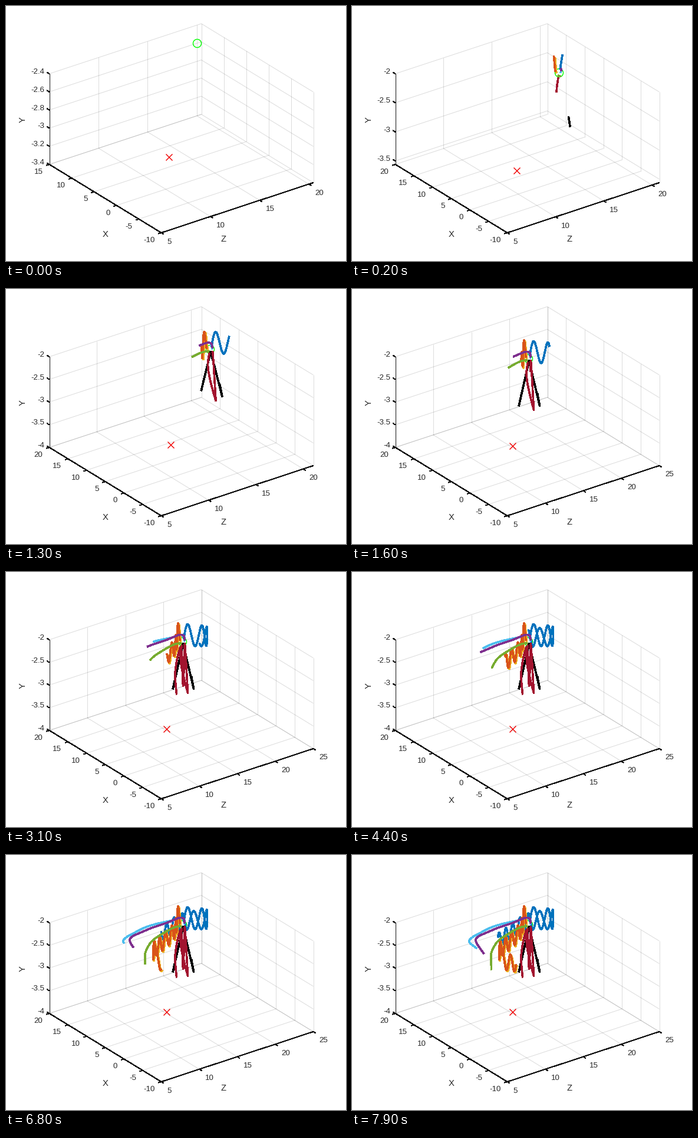
A matplotlib script for the animation above (8000 ms loop, 577 px wide and 433 px high).

```python
import numpy as np
import matplotlib.pyplot as plt
from matplotlib.animation import FuncAnimation
from matplotlib.collections import LineCollection

W, H, DPI = 577, 433, 100
FRAMES, INTERVAL = 80, 100
PX = 72 / DPI  # points per pixel

plt.rcParams["font.family"] = "Liberation Sans"

# Screen vectors of the orthographic box
ORIGIN = np.array([264.0, 385.0])
EX = np.array([-190.0, -116.0])
EY = np.array([0.0, -154.0])
EZ = np.array([258.0, -85.0])


def project(x, y, z, lim):
    x0, x1, y0, y1, z0, z1 = lim
    u = np.atleast_1d((x - x0) / (x1 - x0))[:, None]
    w = np.atleast_1d((y - y0) / (y1 - y0))[:, None]
    v = np.atleast_1d((z - z0) / (z1 - z0))[:, None]
    return ORIGIN + u * EX + w * EY + v * EZ


def unproject(px, py, slope):
    """Lift final-view pixels into space, with depth varying along the screen."""
    v = (14.8 + slope * (px - 300)) / 20
    u = (ORIGIN[0] + EZ[0] * v - px) / -EX[0]
    w = (ORIGIN[1] + EX[1] * u + EZ[1] * v - py) / -EY[1]
    return -10 + 30 * u, -4 + 2 * w, 5 + 20 * v


def smooth(t, keys, vals):
    """Cubic interpolation that is flat at local extremes."""
    h = np.diff(keys)
    d = np.diff(vals) / h
    m = np.zeros(len(keys))
    m[0], m[-1] = d[0], d[-1]
    same = d[:-1] * d[1:] > 0
    m[1:-1][same] = 2 * d[:-1][same] * d[1:][same] / (d[:-1] + d[1:])[same]
    i = np.clip(np.searchsorted(keys, t, side="right") - 1, 0, len(h) - 1)
    s = (t - keys[i]) / h[i]
    return ((1 + 2 * s) * (1 - s) ** 2 * vals[i] + s * (1 - s) ** 2 * h[i] * m[i]
            + s * s * (3 - 2 * s) * vals[i + 1] + s * s * (s - 1) * h[i] * m[i + 1])


def trail(color, *keys, wave=None, shift=(0, 0), slope=0.025, curve=smooth):
    """A glide through (frame, x, y) keys, with an optional vertical wave."""
    kt, kx, ky = np.array(keys, float).T
    t = np.arange(0, kt[-1] + 0.01, 0.1)
    x = curve(t, kt, kx) + shift[0]
    y = curve(t, kt, ky) + shift[1]
    if wave:
        y -= wave(t)
    return color, t, unproject(x, y, slope)


def quickening(t):
    s = t - 3.5
    return (19 - 0.1 * t) * np.cos(2 * np.pi * (s / 11.3 + 0.000265 * s * s))


def steady(t):
    return (14 + 10 * np.exp(-t / 6)) * np.cos(2 * np.pi * (t - 4) / 9.7)


ARM = [(0, 295.5, 96), (5, 291.5, 109), (16, 287.5, 125), (42, 262, 152),
       (57, 250, 163), (68, 264, 182), (79, 279, 184)]

TRAILS = [
    trail("#0072BD", (0, 302, 107), (23, 342, 109), (39.5, 307, 112),
          (79, 248, 144), wave=quickening),
    trail("#4DBEEE", (0, 303, 118), (6, 304, 111), (16, 297, 109),
          (31, 250, 118.5), (42, 226, 128), (64, 199.5, 146.5), (79, 212.5, 159)),
    trail("#EDB120", *ARM, wave=steady, shift=(1.5, 2), slope=0.1),
    trail("#D95319", *ARM, wave=steady, slope=0.1),
    trail("#7E2F8E", (0, 304, 116), (5, 302, 108), (8, 297, 106.5), (16, 274, 115),
          (31, 240, 127), (54, 210.5, 144), (79, 224.5, 168)),
    trail("#77AC30", (0, 303, 123), (3, 296, 121), (16, 265.5, 134),
          (31, 245, 150), (51, 236.5, 170), (79, 237, 195)),
    trail("#000000", (0, 315, 177), (3, 319, 198), (7, 301, 122),
          (14, 283.5, 199), curve=np.interp),
    trail("#A2142F", (0, 299, 124), (2, 296.5, 143), (8, 309, 205), (12, 304, 122),
          (24, 301, 193), (27, 297, 127), (29.5, 287.5, 175), (31, 290, 208)),
]


def limits(n):
    """Axis limits and step of the vertical ticks."""
    z1 = 20.45 + 0.62 * (1 - np.exp(-n / 3)) if n < 16 else 25
    if n == 0:
        return (-10, 15, -3.4, -2.4, 5, z1), 0.2
    return (-10, 20, -3.56 if n < 3 else -4, -2, 5, z1), 0.5


def ticks(lo, hi, step):
    return np.arange(np.ceil(lo / step - 1e-6), np.floor(hi / step + 1e-6) + 1) * step


def draw_box(lim, ystep):
    x0, x1, y0, y1, z0, z1 = lim
    at = lambda x, y, z: project(x, y, z, lim)[0]
    xt, yt, zt = ticks(x0, x1, 5), ticks(y0, y1, ystep), ticks(z0, z1, 5)

    grid = []
    for x in xt:
        grid += [(at(x, y0, z0), at(x, y0, z1)), (at(x, y0, z1), at(x, y1, z1))]
    for z in zt:
        grid += [(at(x0, y0, z), at(x1, y0, z)), (at(x1, y0, z), at(x1, y1, z))]
    for y in yt:
        grid += [(at(x1, y, z0), at(x1, y, z1)), (at(x0, y, z1), at(x1, y, z1))]
    ax.add_collection(LineCollection(grid, colors=[(0.15, 0.15, 0.15, 0.16)],
                                     linewidths=PX, zorder=1))

    left, front, right = at(x1, y0, z0), at(x0, y0, z0), at(x0, y0, z1)
    edges = [(at(x1, y1, z0), left), (left, front), (front, right)]
    groups = [(xt, lambda t: at(t, y0, z0), (-5, 1.6), (-11, 11.5), "right"),
              (yt, lambda t: at(x1, t, z0), (-4, -2.4), (-8, -4.5), "right"),
              (zt, lambda t: at(x0, y0, t), (4, 2.4), (10, 14), "left")]
    for values, place, mark, offset, ha in groups:
        for t in values:
            p = place(t)
            edges.append((p, p + mark))
            ax.text(*(p + offset), f"{round(t, 2):g}", ha=ha, va="center_baseline",
                    fontsize=13.2 * PX, color="#262626")
    ax.add_collection(LineCollection(edges, colors="#111111", linewidths=PX,
                                     antialiaseds=False, zorder=2))

    for name, x, y, turn in [("X", 169, 388, 0), ("Z", 369.5, 396, 0), ("Y", 29, 193, 90)]:
        ax.text(x, y, name, ha="center", va="center", rotation=turn,
                fontsize=14.7 * PX, color="#262626")


def draw(n):
    n = 5 if n == 6 else n  # the motion pauses for one step
    ax.clear()
    ax.set(xlim=(0.5, W + 0.5), ylim=(H, 0))
    ax.axis("off")
    lim, ystep = limits(n)
    draw_box(lim, ystep)

    for pos, shape, size, color in [((-6.8, -2.735, 7.2), "x", 11, "#f00000"),
                                    ((14.5, -2.575, 19.8), "o", 14, "#00ff00")]:
        ax.plot(*project(*pos, lim)[0], shape, ms=size * PX, mfc="none", mec=color,
                mew=1.4 * PX, antialiased=False, zorder=3)

    if n:
        for k, (color, t, pos) in enumerate(TRAILS):
            live = t <= n + 1e-6
            p = project(*(c[live] for c in pos), lim)
            ax.plot(p[:, 0], p[:, 1], color=color, lw=2.6 * PX, zorder=4 + k,
                    antialiased=False, solid_capstyle="butt", solid_joinstyle="round")
    return []


fig = plt.figure(figsize=(W / DPI, H / DPI), dpi=DPI, facecolor="white")
ax = fig.add_axes([0, 0, 1, 1])
anim = FuncAnimation(fig, draw, frames=FRAMES, interval=INTERVAL,
                     init_func=lambda: [], repeat=True, repeat_delay=0)
plt.show()
```
